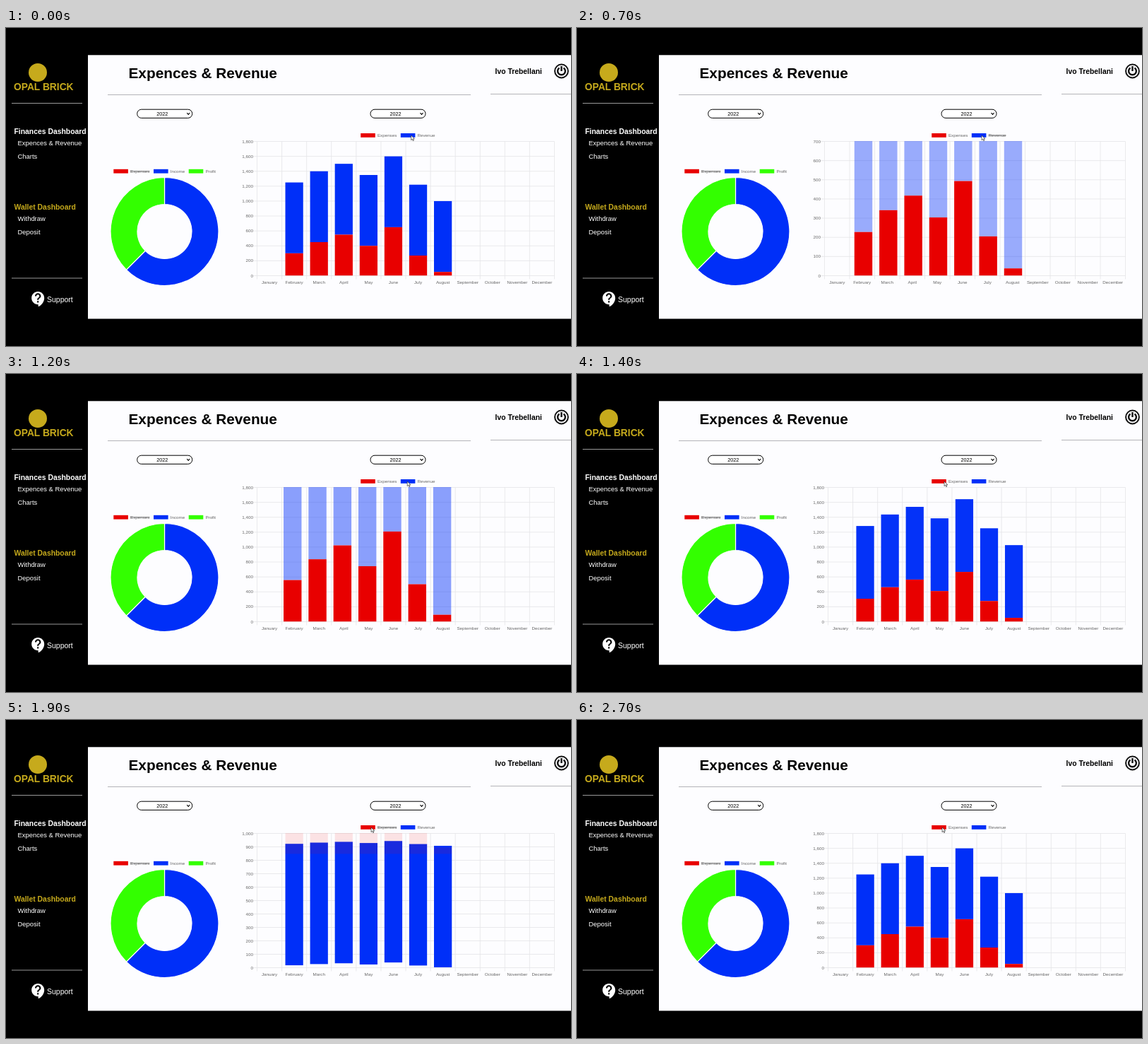
Animation, 800 px wide and 450 px high, one loop 2.8 s. Source, as an HTML page:

```html
<!DOCTYPE html>
<html lang="en">
<head>
<meta charset="utf-8">
<title>Expences &amp; Revenue</title>
<style>
  html, body { margin: 0; width: 100%; height: 100%; overflow: hidden; background: #000; }
  svg { display: block; width: 800px; height: 450px; font: 6.26px "Liberation Sans", Arial, sans-serif; }
  .menu { font-size: 9.45px; fill: #fff; }
  .head { font-size: 10.4px; font-weight: bold; }
  .small { fill: #666; }
  .mid { text-anchor: middle; }
  .end { text-anchor: end; }
  .grid { stroke: #e5e5e7; fill: none; }
</style>
</head>
<body>
<svg viewBox="0 0 800 450">
  <defs><clipPath id="area"><rect x="340" y="160" width="437" height="190.5"/></clipPath></defs>
  <rect width="800" height="450"/>
  <rect x="116" y="38.3" width="684" height="373.2" fill="#fdfdff"/>

  <g fill="#c6aa1c" class="head">
    <circle cx="45" cy="63" r="13"/>
    <text x="11" y="87.5" font-size="13.8" style="font-size:13.8px">OPAL BRICK</text>
    <text x="11.5" y="257">Wallet Dashboard</text>
    <text x="11.5" y="150" fill="#fff">Finances Dashboard</text>
  </g>
  <path d="M8 106.5H108M8 354H108" stroke="#999"/>
  <g class="menu">
    <text x="16.5" y="166">Expences &amp; Revenue</text>
    <text x="16.5" y="185">Charts</text>
    <text x="16.5" y="273">Withdraw</text>
    <text x="16.5" y="292">Deposit</text>
    <text x="58" y="387.5" style="font-size:10.5px">Support</text>
    <path transform="translate(33 371) scale(1.06)" d="M11.5 2C6.8 2 3 5.8 3 10.5S6.8 19 11.5 19h.5v3c4.9-2.3 8-7 8-11.5C20 5.8 16.2 2 11.5 2zm1 14.5h-2v-2h2zm0-3.5h-2c0-3.2 3-3 3-5a2 2 0 0 0-4 0h-2a4 4 0 0 1 8 0c0 2.5-3 2.7-3 5z"/>
  </g>

  <text x="173.5" y="71" class="head" style="font-size:20.8px">Expences &amp; Revenue</text>
  <text x="692.5" y="65" class="head">Ivo Trebellani</text>
  <path d="M144 94.5H658M686 93.5H800" stroke="#b4b4b8"/>
  <g fill="none" stroke="#111" stroke-width="2">
    <circle cx="786.5" cy="61" r="9.4"/>
    <path d="M783.5 56.4a5.4 5.4 0 1 0 6 0M786.5 54v7" stroke-width="2.4"/>
  </g>

  <g id="selects"></g>
  <g id="donut"></g>
  <g id="chart"></g>
  <path id="cursor" d="M0 0V6.6L1.6 5.2 2.7 7.6 3.8 7.1 2.7 4.8H4.8Z" fill="#fff" stroke="#333" stroke-width=".7"/>
</svg>

<script>
const RED = '#e80000', BLUE = '#002ff8', GREEN = '#33ff00';
const LOOP = 2800, STEP = 100, DURATION = 400;
const TOP = 160.5, BOTTOM = 350.5, RIGHT = 776.5;
const MONTHS = ['January', 'February', 'March', 'April', 'May', 'June', 'July',
  'August', 'September', 'October', 'November', 'December'];
const EXPENSES = [300, 450, 550, 400, 650, 270, 50];  // February to August
const REVENUE = 950;

// Each view starts with a click on the legend; hidden: 0 expenses, 1 revenue
const both = { hidden: -1, max: 1800, step: 200, left: 355.5 };
const VIEWS = [
  { ...both, at: -DURATION },
  { hidden: 1, max: 700, step: 100, left: 350.5, at: 617 },
  { ...both, at: 1144 },
  { hidden: 0, max: 1000, step: 100, left: 355.5, at: 1729 },
  { ...both, at: 2168 },
];

const $ = id => document.getElementById(id);
const mix = (a, b, p) => a + (b - a) * p;
const text = (x, y, s, cls = 'small') => `<text x="${x}" y="${y}" class="${cls}">${s}</text>`;
const rect = (x, y, w, h, fill, alpha = 1) =>
  `<rect x="${x}" y="${y}" width="${w}" height="${h}" fill="${fill}" fill-opacity="${alpha}"/>`;

function legend(x, y, label, color, width, struck) {
  return rect(x, y, 20.6, 5.8, color) + text(x + 23.7, y + 5.1, label) +
    (struck ? `<path d="M${x + 23.7} ${y + 2.9}h${width}" stroke="#666" stroke-width=".8"/>` : '');
}

function select(x) {
  return `<rect x="${x}" y="115.2" width="78" height="12.2" rx="6" fill="#fff" stroke="#000"/>` +
    `<text x="${x + 35.5}" y="124" class="mid" style="font-size:7.2px">2022</text>` +
    `<path d="M${x + 70.5} 120.2l2 2.2 2-2.2" fill="none" stroke="#000" stroke-width="1.1"/>`;
}

function donut() {
  const cx = 224.5, cy = 288, R = 76.5, r = 38.5;
  const point = (radius, turn) => {
    const a = turn * 2 * Math.PI;
    return `${cx + radius * Math.sin(a)} ${cy - radius * Math.cos(a)}`;
  };
  const slice = (from, to, color) => {
    const large = to - from > .5 ? 1 : 0;
    return `<path d="M${point(R, from)}A${R} ${R} 0 ${large} 1 ${point(R, to)}L${point(r, to)}` +
      `A${r} ${r} 0 ${large} 0 ${point(r, from)}Z" fill="${color}" stroke="#fff" stroke-width="1.2"/>`;
  };
  return legend(152.3, 199.8, 'Expenses', RED, 27.5, true) + legend(209, 199.8, 'Income', BLUE) +
    legend(258.7, 199.8, 'Profit', GREEN) + slice(0, .625, BLUE) + slice(.625, 1, GREEN);
}

function axes({ max, step, left }) {
  const slot = (RIGHT - left) / 12;
  let lines = '', labels = '';
  for (let v = 0; v <= max; v += step) {
    const y = mix(BOTTOM, TOP, v / max);
    lines += `M${left - 5} ${y}H${RIGHT}`;
    labels += text(left - 5.5, y + 2.1, v.toLocaleString('en-US'), 'small end');
  }
  for (let i = 0; i <= 12; i++) lines += `M${left + i * slot} ${TOP}V${BOTTOM + 5}`;
  MONTHS.forEach((m, i) => labels += text(left + (i + .5) * slot, 361.6, m, 'small mid'));
  return `<path d="${lines}" class="grid" stroke-width=".8"/>` + labels;
}

// Final pose of one bar; a hidden bar rests on top of the visible one
function bar(view, set, i) {
  const values = [EXPENSES[i], REVENUE];
  const slot = (RIGHT - view.left) / 12;
  const base = view.hidden === set ? values[1 - set]
    : set === 1 && view.hidden !== 0 ? values[0] : 0;
  const y = v => BOTTOM - v / view.max * (BOTTOM - TOP);
  return [view.left + (i + 1.5 - .36) * slot, .72 * slot, y(base + values[set]), y(base),
    view.hidden === set ? 0 : 1];
}

function chart(time) {
  const n = VIEWS.findLastIndex(v => v.at <= time);
  const view = VIEWS[n], last = VIEWS[Math.max(n - 1, 0)];
  const p = 1 - (1 - Math.min((time - view.at) / DURATION, 1)) ** 4;
  let bars = '';
  for (const set of [1, 0]) {
    EXPENSES.forEach((_, i) => {
      const to = bar(view, set, i);
      const [x, w, top, base, alpha] = bar(last, set, i).map((a, k) => mix(a, to[k], p));
      if (alpha > 0) bars += rect(x, top, w, base - top, set ? BLUE : RED, alpha);
    });
  }
  return axes(view) + `<g clip-path="url(#area)">${bars}</g>` +
    legend(502.2, 149, 'Expenses', RED, 27.5, view.hidden === 0) +
    legend(558.8, 149, 'Revenue', BLUE, 25, view.hidden === 1);
}

function cursorX(time) {
  if (time < 600) return 573.6;
  const p = Math.min(Math.max((time - 1180) / 220, 0), 1);
  return time < 1500 ? mix(573, 520, p) : 517;
}

function frame() {
  const time = Math.floor(performance.now() % LOOP / STEP) * STEP;
  $('chart').innerHTML = chart(time);
  $('cursor').setAttribute('transform', `translate(${cursorX(time)} 152)`);
  requestAnimationFrame(frame);
}

$('selects').innerHTML = select(185.7) + select(516);
$('donut').innerHTML = donut();
frame();
</script>
</body>
</html>
```
